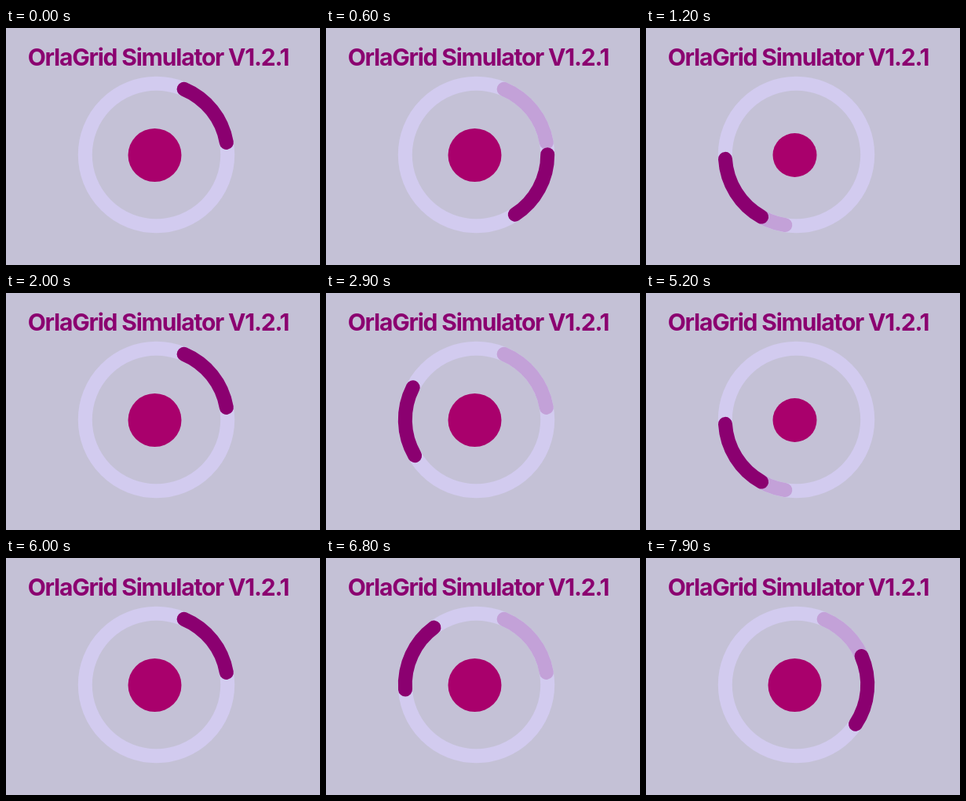
Recreate the animation shown at these times as an HTML page with a canvas. Size 400x302 px, loop 8 s.

```html
<!DOCTYPE html>
<html lang="en">
<head>
<meta charset="utf-8">
<title>OrlaGrid Simulator</title>
<style>
  html, body { margin: 0; width: 100%; height: 100%; overflow: hidden; background: #c4c1d6; }
  canvas { display: block; position: absolute; left: 0; top: 0; }
  h1 {
    position: absolute; left: 0; top: 18px; width: 388px; margin: 0;
    font: 700 30px/38px Inter, "Open Sans", sans-serif;
    letter-spacing: -1.2px; text-align: center; white-space: nowrap; color: #8b0070;
  }
</style>
</head>
<body>
<canvas id="stage" width="400" height="302"></canvas>
<h1>OrlaGrid Simulator V1.2.1</h1>
<script>
const ctx = document.getElementById('stage').getContext('2d');
const LOOP = 8000, CYCLE = 4000, LEG = 1000, SMALL_TIME = 400;
const RING = { x: 191.5, y: 161.5, r: 90.7, width: 18 };
const TOP_STOP = 22.8, LOW_STOP = 189, SPAN = 57.3;
const STOPS = [TOP_STOP, LOW_STOP, TOP_STOP + 360, LOW_STOP, TOP_STOP];

// Slow start, quick arrival at the next stop
const ease = u => 0.45 * u + 0.37 * u * u + 0.18 * u ** 16;

// Degrees clockwise from twelve o'clock
function arc(start, span, color) {
  const from = (start - 90) * Math.PI / 180;
  ctx.beginPath();
  ctx.arc(RING.x, RING.y, RING.r, from, from + span * Math.PI / 180);
  ctx.strokeStyle = color;
  ctx.stroke();
}

function disc(r) {
  ctx.beginPath();
  ctx.arc(189.5, 162, r, 0, Math.PI * 2);
  ctx.fillStyle = '#a9006c';
  ctx.fill();
}

function spinnerAngle(t) {
  const leg = Math.floor(t / LEG);
  const a = STOPS[leg], b = STOPS[leg + 1];
  return a + (b - a) * ease(t % LEG / LEG);
}

function draw(ms) {
  const t = ms % LOOP % CYCLE;
  const beat = t % (2 * LEG);
  const small = beat >= LEG && beat < LEG + SMALL_TIME;

  ctx.fillStyle = '#c4c1d6';
  ctx.fillRect(0, 0, 400, 302);
  ctx.lineWidth = RING.width;
  ctx.lineCap = 'round';
  arc(0, 360, '#d2cbef');
  arc(small ? LOW_STOP : TOP_STOP, SPAN, '#c3a1d8');
  arc(spinnerAngle(t), SPAN, '#8b0070');
  disc(small ? 28 : 34);
}

let begin;
function tick(now) {
  begin ??= now;
  draw(now - begin);
  requestAnimationFrame(tick);
}
draw(0);
requestAnimationFrame(tick);
</script>
</body>
</html>
```
